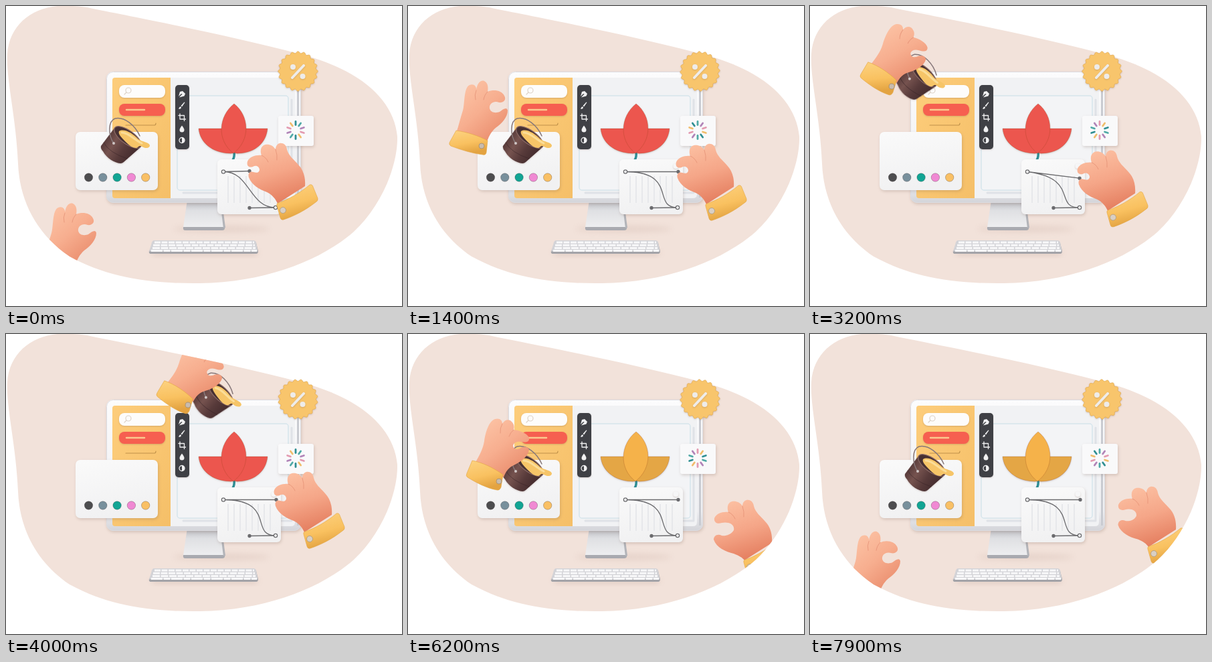
An HTML page that plays this animation: 592 by 448 pixels, repeating every 8000 ms.

```html
<!DOCTYPE html>
<html lang="en">
<head>
<meta charset="utf-8">
<title>Design studio</title>
<style>
html,body{margin:0;width:100%;height:100%;overflow:hidden;background:#fff}
svg{display:block;width:592px;height:448px}
.soft{filter:drop-shadow(.5px 1px 1px rgba(110,80,70,.25))}
.lift{filter:drop-shadow(1px 2px 2px rgba(110,80,70,.22))}
.line{fill:none;stroke-linecap:round;stroke-linejoin:round}
</style>
</head>
<body>
<svg viewBox="0 0 592 448">
<defs>
  <path id="blob" d="M95 0C45-4 5 25 2 72C0 110 15 165 18 235C20 290 45 340 95 374C150 404 210 415 290 414C390 412 470 380 520 337C560 300 586 240 585 195C580 140 530 95 440 72C340 45 200 18 130 4C118 1 108 0 95 0Z"/>
  <clipPath id="inside"><use href="#blob"/></clipPath>
  <linearGradient id="skinL" x1=".1" y1="0" x2=".8" y2="1">
    <stop offset="0" stop-color="#fdc6a8"/><stop offset=".5" stop-color="#f7ae8f"/><stop offset="1" stop-color="#e88868"/>
  </linearGradient>
  <linearGradient id="skinR" x1=".3" y1="0" x2=".6" y2="1">
    <stop offset="0" stop-color="#fcc0a2"/><stop offset=".5" stop-color="#f5a688"/><stop offset="1" stop-color="#e47d5e"/>
  </linearGradient>
  <linearGradient id="cuff" x1="0" y1="0" x2=".3" y2="1">
    <stop offset="0" stop-color="#fdd382"/><stop offset=".6" stop-color="#f9c160"/><stop offset="1" stop-color="#e3a341"/>
  </linearGradient>
  <linearGradient id="frame" x1="0" y1="0" x2="0" y2="1">
    <stop offset="0" stop-color="#fcfcfd"/><stop offset=".85" stop-color="#eeeef1"/><stop offset="1" stop-color="#d3d4d9"/>
  </linearGradient>
  <linearGradient id="card" x1="0" y1="0" x2=".3" y2="1">
    <stop offset="0" stop-color="#fafafa"/><stop offset="1" stop-color="#f1f1f2"/>
  </linearGradient>
  <linearGradient id="side" x1="0" y1="0" x2="1" y2="1">
    <stop offset="0" stop-color="#fdcd7b"/><stop offset="1" stop-color="#f5bf68"/>
  </linearGradient>
  <linearGradient id="stand" x1="0" y1="0" x2="0" y2="1">
    <stop offset="0" stop-color="#b9babf"/><stop offset=".35" stop-color="#dfe0e3"/><stop offset="1" stop-color="#f0f0f2"/>
  </linearGradient>
  <linearGradient id="tin" x1="0" y1=".2" x2="1" y2=".8">
    <stop offset="0" stop-color="#432b2d"/><stop offset=".35" stop-color="#76534f"/><stop offset=".6" stop-color="#573a3a"/><stop offset="1" stop-color="#3b2528"/>
  </linearGradient>
  <filter id="blur" x="-30%" y="-80%" width="160%" height="260%"><feGaussianBlur stdDeviation="4"/></filter>
</defs>

<use href="#blob" fill="#f2e2da"/>

<!-- monitor -->
<ellipse cx="322" cy="333" rx="72" ry="5" fill="#cbb0a6" opacity=".3" filter="url(#blur)"/>
<path d="M271 290H322L327 330Q327 334 323 334H268Q264 334 265 330Z" fill="url(#stand)"/>
<path d="M265 330H327Q328 335 323 335H268Q264 335 265 330Z" fill="#a9aab0"/>
<path d="M320 292H323L328 331 325 332Z" fill="#b3b4b9"/>
<g class="lift">
  <rect x="150" y="98" width="291" height="196" rx="10" fill="url(#frame)"/>
  <rect x="150.500" y="98.500" width="290" height="195" rx="10" fill="none" stroke="#dcdce1"/>
</g>
<path d="M246 107H426Q432 107 432 113V281Q432 287 426 287H246Z" fill="#f1f2f4"/>
<path d="M163 107H246V287H163Q159 287 159 283V111Q159 107 163 107Z" fill="url(#side)"/>
<path d="M436.500 106V286" stroke="#c9cbd1" stroke-width="3"/>
<rect x="256" y="134" width="166" height="141" rx="4" fill="#f3f4f6" stroke="#d6e5ec" stroke-width="1.500"/>
<path d="M427 140V279H265" class="line" stroke="#dfe2e7" stroke-width="3"/>

<!-- sidebar -->
<g class="soft">
  <rect x="169" y="118" width="69" height="19" rx="8" fill="#fdfcfb"/>
  <rect x="169" y="146" width="69" height="18" rx="8" fill="#f65f50"/>
</g>
<g class="line" stroke="#ddd3c8" stroke-width="1.200"><circle cx="183" cy="126" r="4"/><path d="M180 129L177 132"/></g>
<path d="M180 155H207" class="line" stroke="#fbc98f" stroke-width="2.500"/>
<path d="M179 178H222Q224 178 224 175" class="line" stroke="#c2924a" stroke-width="1.200"/>

<!-- toolbar -->
<rect class="soft" x="253" y="118" width="21" height="96" rx="5" fill="#3f4045"/>
<g fill="#f0f0f1">
  <path d="M260 128L264 127 268 131 266.500 134.500 259 136.500 262 133 263.500 132 262.500 131 261 132 258 135Z"/>
  <path d="M267.500 144L263 150.500 261.500 149 266.500 143.500ZM262 151.500Q261.500 154.500 258 153.500Q259 150.500 261 150Z"/>
  <path d="M263 178.500Q266.500 183 266.500 185A3.500 3.500 0 0 1 259.500 185Q259.500 183 263 178.500Z"/>
  <path d="M263 196.500A4 4 0 0 1 263 204.500Z"/>
</g>
<g class="line" stroke="#f0f0f1" stroke-width="1.300"><path d="M260 161V169H268.500M258 163.500H266.500V171.500"/><circle cx="263" cy="200.500" r="4"/></g>

<!-- flower -->
<path d="M341 218Q342 225 339 230" class="line" stroke="#2f8e94" stroke-width="3.500"/>
<g class="soft" id="flower" stroke="rgba(140,60,20,.3)" stroke-width=".8" stroke-linejoin="round">
  <path d="M288 183H323L341 219Q338 220.500 334 220C308 219 290 204 288 183Z"/>
  <path d="M391 183H358L341 219Q344 220.500 348 220C373 219 389 204 391 183Z"/>
  <path d="M341 146C318 164 314 200 340 220C366 200 364 164 341 146Z"/>
</g>

<!-- badge -->
<g class="soft"><path id="badge" fill="#f8c56c" stroke="#e3a94d" stroke-width=".7"/></g>
<g class="soft">
  <path d="M428 107L445 89" class="line" stroke="#eeecea" stroke-width="4"/>
  <circle cx="429" cy="91" r="4" fill="#eeecea"/><circle cx="443.500" cy="105" r="4" fill="#eeecea"/>
</g>

<!-- loader -->
<rect class="lift" x="407" y="164" width="53" height="45" rx="3" fill="#f9f9fa"/>
<g id="loader" class="line" stroke-width="2.800"></g>

<!-- keyboard -->
<path d="M216 366H377L374 372H222Z" fill="#bda197" opacity=".4" filter="url(#blur)"/>
<path d="M221 351H370Q373 351 374 354L377 366Q377 370 374 370H217Q213 370 214 366Z" fill="#a3a3a8"/>
<path d="M221 350H370Q373 350 374 353L376.500 366.500H214L218 353Q219 350 221 350Z" fill="#d3d3d7"/>
<g stroke="#f8f8f9" stroke-width="3">
  <path d="M222 353H371" stroke-dasharray="9 1.500"/><path d="M220 357.300H372" stroke-dasharray="10 1.500"/>
  <path d="M219 361.600H373" stroke-dasharray="11 1.500"/><path d="M217 365.500H375" stroke-dasharray="17 1.500 10 1.500"/>
</g>

<!-- palette -->
<rect class="lift" x="104" y="188" width="123" height="87" rx="7" fill="url(#card)"/>
<g id="dots" stroke="rgba(60,50,50,.3)"></g>

<!-- curve panel -->
<rect class="lift" x="316" y="229" width="95" height="82" rx="6" fill="url(#card)"/>
<path d="M332 254V294M341 254V294M350 254V294M359 254V294M368 254V294M377 254V294M386 254V294M395 254V294" stroke="#e7e8eb" stroke-width="2"/>
<circle class="soft" cx="400.500" cy="239" r="4" fill="#f6f6f7"/>
<g stroke="#6b6b6e" stroke-width="1.300" fill="none">
  <path id="bezier"/>
  <path d="M364 301.500L403 301"/>
  <circle cx="325" cy="247.500" r="2.600" fill="#fff"/><circle cx="403" cy="301" r="2.600" fill="#fff"/>
  <circle cx="364" cy="301.500" r="2" fill="#6b6b6e"/><circle id="knob" r="2" fill="#6b6b6e"/>
</g>

<!-- paint bucket -->
<g id="bucket">
  <path class="soft" d="M163 181L142 209Q141 213 145 217C151 228 162 234 171 235Q174 235 176 233L201 211Z" fill="url(#tin)"/>
  <path d="M146 204Q154 219 181 228" class="line" stroke="#342124" opacity=".5"/>
  <ellipse cx="182" cy="196" rx="24" ry="10" transform="rotate(36 182 196)" fill="#473032" stroke="#8a6a66" stroke-width="1.300"/>
  <path d="M169 187C176 182 190 190 198 199C204 203 213 203 215 208C215 213 208 213 203 210C199 207 198 211 195 212C189 212 184 208 179 203C173 197 167 191 169 187Z" fill="#f6c568"/>
  <path d="M173 189C183 189 192 200 203 205" class="line" stroke="#fbdd98" stroke-width="3"/>
  <path d="M161 205C153 194 152 172 163 168C177 165 193 178 200 194" class="line" stroke="#87787a" stroke-width="1.500"/>
  <circle cx="161" cy="205" r="2" fill="#cfc6c5"/>
</g>

<!-- hands -->
<g clip-path="url(#inside)">
  <g id="left">
    <path id="leftSkin" fill="url(#skinL)"/>
    <path id="leftFold" class="line" stroke="#de866b" opacity=".6"/>
    <path id="leftCuff" fill="url(#cuff)" stroke="#e2a540" stroke-width=".6"/>
    <circle cx="136" cy="220" r="4" fill="#c9bcae" stroke="#a08c72" stroke-width=".8"/>
  </g>
</g>
<g clip-path="url(#inside)">
  <g id="right">
    <path id="rightSkin" fill="url(#skinR)"/>
    <path d="M443 215Q446 224 445 231M422 224Q429 227 432 234" class="line" stroke="#de866b" opacity=".6"/>
    <path d="M447 295C462 290 480 280 494 268Q498 267 499 271L506 288Q507 292 503 294C488 306 470 315 455 320Q451 321 450 317L445 299Q444 296 447 295Z" fill="url(#cuff)" stroke="#e2a540" stroke-width=".6"/>
    <circle cx="454" cy="306" r="4.500" fill="#d9cfc4" stroke="#ad987c" stroke-width=".8"/>
  </g>
</g>
</svg>
<script>
const LOOP = 8000;
const $ = id => document.getElementById(id);
const set = (id, attr, v) => $(id).setAttribute(attr, v);
const lerp = (a, b, k) => a + (b - a) * k;
const clamp = v => Math.min(1, Math.max(0, v));
const smooth = p => p * p * (3 - 2 * p);

// Blends two paths that share the same commands.
function mix(a, b, k) {
  const ends = b.match(/[\d.]+/g);
  let i = 0;
  return a.replace(/[\d.]+/g, v => lerp(+v, +ends[i++], k).toFixed(2));
}

// Keys: time, x, y, grip, tilt, sideways bow on the way to this key.
function track(keys, t) {
  const i = keys.findIndex(k => k[0] > t);
  const [t0, x0, y0, g0, r0 = 0] = keys[i - 1], [t1, x1, y1, g1, r1 = 0, bow = 0] = keys[i];
  const p = smooth((t - t0) / (t1 - t0));
  return [lerp(x0, x1, p) + bow * Math.sin(Math.PI * p), lerp(y0, y1, p), lerp(g0, g1, p), lerp(r0, r1, p)];
}

const leftKeys = [
  [0, -40, 172, 0], [450, -40, 172, 0], [1350, -26, -11, 0, 0, -24], [1450, -26, -11, 0], [1800, 0, 0, 1],
  [1880, 0, 0, 1], [2550, -15, -97, 1, 8], [2850, -17, -98, 1, 8], [3200, -7, -95, 1, 8], [3380, -5, -95, 1, 8],
  [4000, 143, -109, 1, 8], [4600, 145, -107, 1, 8], [5300, 143, -109, 1, 8], [5430, 143, -109, 1, 8], [6100, 0, 0, 1],
  [6250, 0, 0, 1], [7150, -40, 172, 0, 0, -12], [7500, -40, 175, 0], [8000, -40, 172, 0]
];
const rightKeys = [
  [0, -40, -1, 1], [650, -40, -1, 1], [1400, 0, 0, 1], [2000, 0, 0, 1], [3100, -1, 10, 1], [4000, 0, 0, 1],
  [4080, 0, 0, 1], [4550, 51, 25, 0], [5300, 51, 25, 0], [6200, 57, 42, 0], [7150, 56, 40, 0], [7900, 60, 22, .2], [8000, 60, 22, .2]
];

// Each pair is the open pose and the pinching pose.
const leftHand = [
  'M98 201C102 189 104 179 108 167C111 157 109 133 118 129C125 126 129 132 128 137C129 126 135 121 140 123C146 126 146 133 145 139C154 135 166 137 170 145C174 152 167 156 162 155C154 152 147 157 148 164C150 171 158 171 163 169C168 165 174 161 175 167C175 177 166 187 157 193C150 199 146 207 143 217Z',
  'M100 193C107 181 112 172 114 160C116 146 121 130 130 127C137 125 141 129 141 134C145 127 152 127 155 131C159 135 159 139 158 143C167 144 178 148 181 155C182 162 175 162 169 161C163 160 158 162 157 167C158 172 162 173 167 171C173 167 180 168 181 173C180 182 170 190 160 195C150 199 146 206 143 214Z'
];
const leftFold = [
  'M128 137Q125 144 127 151M145 139Q140 144 139 151',
  'M141 134Q137 141 138 148M158 143Q153 147 151 153'
];
const leftCuff = [
  'M98 197C114 199 132 205 145 212L143 230Q142 234 138 233C122 231 106 226 90 220Q87 218 88 215Z',
  'M96 189C112 192 128 200 142 210L139 229Q137 234 133 233C117 230 102 222 89 214Q86 212 88 208Z'
];
const back = 'M487 270C488 258 485 246 477 238C470 230 462 224 460 215C459 208 454 205 449 206C445 207 443 211 443 215C439 208 430 206 425 209C420 212 420 219 422 224';
const rightHand = [
  back + 'C413 223 404 226 401 233C400 240 406 242 412 240C422 238 432 242 430 251C426 258 417 260 412 259C406 256 400 259 400 265C404 277 418 283 430 286C438 289 443 292 446 296Z',
  back + 'C414 223 404 226 401 233C399 240 404 243 409 241C414 238 419 241 419 246C418 251 413 250 410 249C405 247 401 251 403 257C407 268 419 275 430 279C438 283 443 289 446 296Z'
];

const colors = ['#4d4d4f', '#78909c', '#12a594', '#f089d3', '#f9c065'];
const spin = ['#2f8f92', '#4fa9a6', '#b184b8', '#e39ab0', '#f0bd6c'];
$('dots').innerHTML = colors.map((c, i) => `<circle cx="${123.5 + i * 21.3}" cy="256" r="6.200" fill="${c}"/>`).join('');
$('loader').innerHTML = Array.from({length: 10}, (_, i) =>
  `<path d="M433 177.500V172.500" transform="rotate(${i * 36} 433 185.500)"/>`).join('');
const ticks = [...$('loader').children];
const petals = [...$('flower').children];

function badgePath(turn) {
  let d = '';
  for (let i = 0; i < 160; i++) {
    const a = i * Math.PI / 80, r = 28.3 + 1.4 * Math.cos(20 * a);
    d += `${i ? 'L' : 'M'}${(436.5 + r * Math.cos(a + turn)).toFixed(2)} ${(97.5 + r * Math.sin(a + turn)).toFixed(2)}`;
  }
  return d + 'Z';
}

function paint(k, shade) {
  const red = [236, 86, 78], gold = [245, 178, 74];
  return `rgb(${red.map((v, i) => Math.round(lerp(v, gold[i] * shade, k)))})`;
}

function draw(t) {
  const [lx, ly, lk, tilt] = track(leftKeys, t);
  const carry = `translate(${lx} ${ly}) rotate(${tilt} 168 168)`;
  set('left', 'transform', carry);
  set('leftSkin', 'd', mix(...leftHand, lk));
  set('leftFold', 'd', mix(...leftFold, lk));
  set('leftCuff', 'd', mix(...leftCuff, lk));
  const held = t > 1850 && t < 6200;
  set('bucket', 'transform', held ? carry : '');

  const [rx, ry, rk] = track(rightKeys, t);
  set('right', 'transform', `translate(${rx} ${ry})`);
  set('rightSkin', 'd', mix(...rightHand, rk));
  const drag = t < 4080;
  const hx = 404 + (drag ? rx : 0), hy = 247.5 + (drag ? ry : 0);
  set('bezier', 'd', `M325 247.500L${hx} ${hy}M325 247.500C${hx} ${hy} 364 301.500 403 301`);
  set('knob', 'cx', hx);
  set('knob', 'cy', hy);

  const k = smooth(clamp((t - 4250) / 550));
  petals.forEach((p, i) => p.setAttribute('fill', paint(k, i < 2 ? .93 : 1)));

  set('badge', 'd', badgePath(t / LOOP * Math.PI / 2));
  const step = Math.floor(t / 100);
  ticks.forEach((p, i) => p.setAttribute('stroke', spin[(i + 4 * step) % 5]));
}

const start = performance.now();
function loop() {
  draw((performance.now() - start) % LOOP);
  requestAnimationFrame(loop);
}
loop();
</script>
</body>
</html>
```
